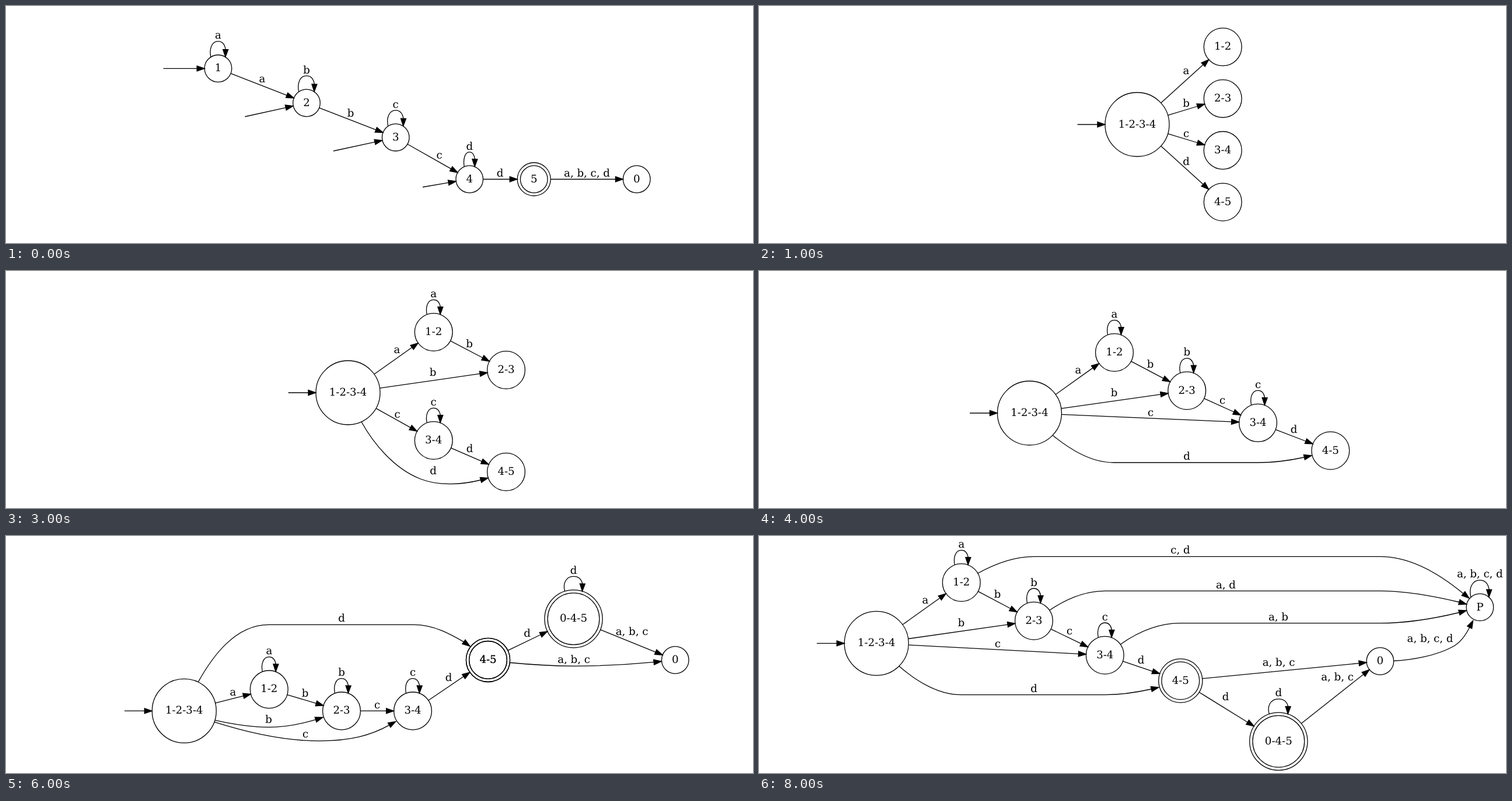
These frames come from a looping animation (1280 by 407 pixels, 9000 ms). An HTML page:

```html
<!DOCTYPE html>
<html lang="en">
<head>
<meta charset="utf-8">
<title>Automaton determinization</title>
<style>
  html, body { margin: 0; height: 100%; overflow: hidden; background: #fff; }
  svg { display: block; width: 100%; height: 100%; }
  path, circle { fill: none; stroke: #000; stroke-width: 1.3; }
  path.tip { fill: #000; }
  text { font: 18.15px "DejaVu Serif", "Noto Serif", serif; text-anchor: middle; text-rendering: geometricPrecision; }
</style>
</head>
<body>
<svg id="stage" viewBox="0 0 1280 407"></svg>
<script>
const HEAD = 13, RING = 5.2;
const RADIUS = { 1: 23.3, 3: 32.4, 5: 44.4, 7: 55 };
const ALL = "1-2-3-4";

const path = (d, cls = "") => `<path class="${cls}" d="${d}"/>`;
const text = (s, x, y) => `<text x="${x}" y="${y}">${s}</text>`;
const label = (s, x, y) => text(s, x, y + 5.7);

function head(x0, y0, x1, y1) {
  const len = Math.hypot(x1 - x0, y1 - y0), ux = (x1 - x0) / len, uy = (y1 - y0) / len;
  const bx = x1 - ux * HEAD, by = y1 - uy * HEAD, w = 4.5;
  return path(`M${x1},${y1}L${bx - uy * w},${by + ux * w}L${bx + uy * w},${by - ux * w}Z`, "tip");
}

const arrow = (x0, y0, x1, y1) => {
  const k = 1 - HEAD / Math.hypot(x1 - x0, y1 - y0);
  return path(`M${x0},${y0}L${x0 + (x1 - x0) * k},${y0 + (y1 - y0) * k}`) + head(x0, y0, x1, y1);
};

function render({ nodes, edges = [], loops = [], curves = [], entries }) {
  const radius = n => RADIUS[n.length] + (nodes[n][2] ? RING : 0);
  let out = "";

  for (const n in nodes) {
    const [x, y, final] = nodes[n];
    out += `<circle cx="${x}" cy="${y}" r="${RADIUS[n.length]}"/>`;
    if (final) out += `<circle cx="${x}" cy="${y}" r="${radius(n)}"/>`;
    out += text(n, x, y + 5.1);
  }

  for (const [a, b, s, lx, ly] of edges) {
    const [x0, y0] = nodes[a], [x1, y1] = nodes[b];
    const len = Math.hypot(x1 - x0, y1 - y0), ux = (x1 - x0) / len, uy = (y1 - y0) / len;
    const ra = radius(a), rb = radius(b);
    out += arrow(x0 + ux * ra, y0 + uy * ra, x1 - ux * rb, y1 - uy * rb) + label(s, lx, ly);
  }

  for (const [n, s, w = 11.4] of loops) {
    const [x, y] = nodes[n], r = radius(n);
    const base = y - Math.sqrt(r * r - w * w), top = y - r - 23.3, rise = base - top;
    out += path(`M${x - w},${base}C${x - 1.25 * w},${base - .52 * rise} ${x - .875 * w},${top} ${x},${top}` +
      `C${x + .55 * w},${top} ${x + .89 * w},${top + 4.6} ${x + 1.02 * w},${base - HEAD}`);
    out += head(x + 1.02 * w, base - HEAD, x + w, base) + text(s, x, y - r - 27.7);
  }

  for (const [s, lx, ly, d, tx, ty] of curves) {
    const [bx, by] = d.match(/[\d.]+/g).slice(-2).map(Number);
    out += path(d) + head(bx, by, tx, ty) + label(s, lx, ly);
  }

  if (entries) for (const e of entries) out += arrow(...e);
  else {
    const [x, y] = nodes[ALL];
    out += arrow(x - 102.3, y, x - 55, y);
  }
  return out;
}

// The left part shared by two layouts, drawn at an offset.
const chain = {
  nodes: { [ALL]: [363.3, 259], "1-2": [508.8, 222], "2-3": [633, 259], "3-4": [755, 259], "4-5": [884, 171.5, 1] },
  edges: [[ALL, "1-2", "a", 447, 227], ["1-2", "2-3", "b", 570.5, 229],
    ["2-3", "3-4", "c", 694, 249], ["3-4", "4-5", "d", 816.5, 202]],
  loops: [["1-2", "a"], ["2-3", "b"], ["3-4", "c"]],
  curves: [
    ["d", 633, 100, "M387.5,209C411,167 450,111 508,111H757C792,111 821,128 842.5,140.5", 853, 148],
    ["b", 508, 274, "M416,275C443,281 476,287 508,287C537,287 565,281 588.5,274", 601, 270],
    ["c", 571, 299, "M415,278C465,294 530,310.5 595,310.5C650,310.5 685,300 714.5,283.5", 726, 277]]
};

const scenes = [
  [0, render({
    nodes: { 1: [363.5, 107.3], 2: [515, 166.5], 3: [667.7, 225.7], 4: [794.2, 297.5], 5: [904.7, 297.5, 1], 0: [1080.7, 297.5] },
    edges: [["1", "2", "a", 439, 125], ["2", "3", "b", 590.5, 184], ["3", "4", "c", 742.5, 256],
      ["4", "5", "d", 846.5, 287], ["5", "0", "a, b, c, d", 995.5, 287]],
    loops: [["1", "a", 12.5], ["2", "b", 13.2], ["3", "c", 13], ["4", "d", 9]],
    entries: [[269.5, 107.3, 340.2, 107.3], [409.5, 190, 492, 171.7], [561, 249, 644.7, 230.8], [714, 311, 771, 301.2]]
  })],
  [1000, render({
    nodes: { [ALL]: [648, 203.5], "1-2": [794.7, 70.3], "2-3": [794.7, 159.1], "3-4": [794.7, 247.9], "4-5": [794.7, 336.7] },
    edges: [[ALL, "1-2", "a", 732, 111], [ALL, "2-3", "b", 732, 167], [ALL, "3-4", "c", 732, 219], [ALL, "4-5", "d", 732, 267]]
  })],
  [2000, render({
    nodes: { [ALL]: [586, 188.7], "1-2": [732.7, 66.7], "2-3": [732.7, 155.3], "3-4": [732.7, 286.5], "4-5": [857, 340.5] },
    edges: [[ALL, "1-2", "a", 670, 104], [ALL, "2-3", "b", 670, 158], [ALL, "3-4", "c", 670.5, 234], ["3-4", "4-5", "d", 794.5, 301]],
    loops: [["3-4", "c"]],
    curves: [["d", 732, 339, "M607.5,239.5C626,277 661,333 710,353C742,366 783,362 813,354.5", 826, 351]]
  })],
  [3000, render({
    nodes: { [ALL]: [586, 209], "1-2": [732.7, 105], "2-3": [857, 170], "3-4": [732.7, 291], "4-5": [857, 345] },
    edges: [[ALL, "1-2", "a", 670, 135], ["1-2", "2-3", "b", 794, 125], [ALL, "2-3", "b", 731.5, 174],
      [ALL, "3-4", "c", 670.5, 246], ["3-4", "4-5", "d", 794.5, 305.5]],
    loops: [["1-2", "a"], ["3-4", "c"]],
    curves: [["d", 732, 343.5, "M609,259C629,295 664,339 710,357C742,370 783,366.5 813,359", 826, 355.5]]
  })],
  [4000, render({
    nodes: { [ALL]: [463.5, 244], "1-2": [609, 140], "2-3": [733.2, 205.5], "3-4": [855, 260.8], "4-5": [979.3, 308.5] },
    edges: [[ALL, "1-2", "a", 547, 170], ["1-2", "2-3", "b", 670.5, 160], [ALL, "2-3", "b", 608.5, 209],
      ["2-3", "3-4", "c", 794, 222], [ALL, "3-4", "c", 671, 243], ["3-4", "4-5", "d", 916.5, 272]],
    loops: [["1-2", "a"], ["2-3", "b"], ["3-4", "c"]],
    curves: [["d", 733, 318, "M503,282C530,304 567,329 608,329H855C883,329 911,325 934,320", 947, 317]]
  })],
  [5000, render({
    ...chain,
    nodes: { ...chain.nodes, 0: [1067.7, 126.5], "0-4-5": [1067.7, 216.7] },
    edges: [...chain.edges, ["4-5", "0", "a, b, c", 973, 134], ["4-5", "0-4-5", "d", 972, 178]]
  })],
  [6000, `<g transform="translate(-58 41.4)">${render(chain)}</g>` + render({
    nodes: { "4-5": [826, 212.9, 1], "0-4-5": [972.5, 142.3, 1], 0: [1146.7, 213] },
    edges: [["4-5", "0-4-5", "d", 893, 167], ["0-4-5", "0", "a, b, c", 1072.5, 164]],
    loops: [["0-4-5", "d", 15]],
    curves: [["a, b, c", 973, 212, "M864,217.5C900,221 935,223.3 973,223.3C1020,223.3 1070,220.5 1110,216.7", 1123, 215.3]],
    entries: []
  })],
  [8000, render({
    nodes: { [ALL]: [201.3, 184.3], "1-2": [346.8, 80], "2-3": [471, 145.7], "3-4": [592.8, 204.7],
      "4-5": [722.3, 248.5, 1], "0-4-5": [890.3, 352.7, 1], 0: [1064.3, 215], P: [1235.3, 122.4] },
    edges: [[ALL, "1-2", "a", 285, 110], ["1-2", "2-3", "b", 408.5, 100], [ALL, "2-3", "b", 346.5, 149],
      ["2-3", "3-4", "c", 532, 163], [ALL, "3-4", "c", 409, 185.5], ["3-4", "4-5", "d", 654.5, 213.5],
      ["4-5", "0", "a, b, c", 890.5, 217.5], ["4-5", "0-4-5", "d", 799.5, 276], ["0-4-5", "0", "a, b, c", 991, 242]],
    loops: [["1-2", "a"], ["2-3", "b"], ["3-4", "c"], ["0-4-5", "d", 16], ["P", "a, b, c, d", 15.5]],
    curves: [
      ["d", 471, 262, "M240,223.5C267,247 305,272.7 347,272.7H593C622,272.7 647,268.5 672,263", 685, 260],
      ["c, d", 722, 24.5, "M375,64C402,49 435,35.3 471,35.3H1065C1120,35.3 1172,70 1206.5,98.5", 1217, 107],
      ["a, d", 800, 84, "M498,127.5C525,109 556,94.3 593,94.3H1065C1110,94.3 1160,104 1199.5,113.5", 1212.3, 117],
      ["a, b", 890, 139, "M619.5,186C645,168 680,149.7 722,149.7H1065C1110,149.7 1160,141 1199.5,131.5", 1212.3, 128],
      ["a, b, c, d", 1150, 176.5, "M1087.6,214.5C1118,213 1160,206 1189,190C1202,183 1211,170 1217.5,157", 1223.5, 145.3]]
  })]
];

const stage = document.getElementById("stage");
let shown = -1;
function tick() {
  const t = performance.now() % 9000;
  const now = scenes.filter(([at]) => at <= t).length - 1;
  if (now !== shown) stage.innerHTML = scenes[shown = now][1];
  requestAnimationFrame(tick);
}
tick();
</script>
</body>
</html>
```
